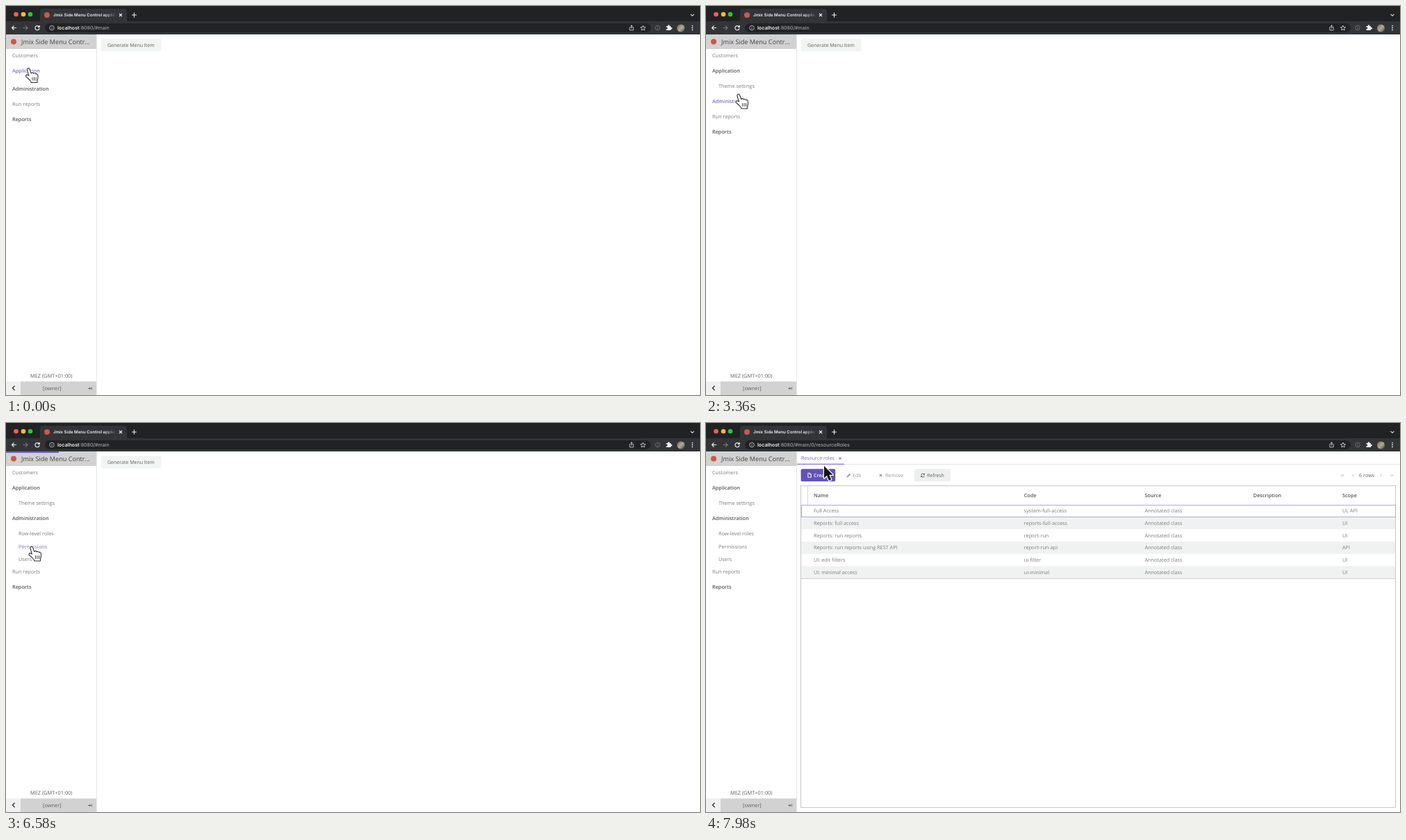
An HTML page with a canvas for the animation above (8 s loop, 999x561 px).

```html
<!DOCTYPE html>
<html lang="en">
<head>
<meta charset="utf-8">
<title>Side menu</title>
<style>
html, body { margin: 0; width: 100%; height: 100%; overflow: hidden; background: #fff; }
canvas { display: block; }
</style>
</head>
<body>
<canvas width="999" height="561"></canvas>
<script>
const LOOP = 8000, STEP = 70;
const APP = '"Open Sans", sans-serif', CHROME = 'Inter, sans-serif';
const PURPLE = '#6351b8', GREY = '#7c7c7c', DARK = '#585858';
const c = document.querySelector('canvas').getContext('2d');
c.textRendering = 'geometricPrecision';

// Pointer hot spot: time, x, y
const PATH = [
  [70, 32.5, 90.5], [840, 34, 91], [1680, 35, 90.5], [2730, 35, 90.5],
  [3360, 47, 128], [3500, 48, 129], [4060, 48, 129], [4550, 49, 131],
  [4900, 65, 165], [5460, 56, 175], [5810, 37, 179], [7210, 37, 179],
  [7910, 170, 62]
];
const ROLES = [
  ['Full Access', 'system-full-access', 'UI, API'],
  ['Reports: full access', 'reports-full-access', 'UI'],
  ['Reports: run reports', 'report-run', 'UI'],
  ['Reports: run reports using REST API', 'report-run-api', 'API'],
  ['UI: edit filters', 'ui-filter', 'UI'],
  ['UI: minimal access', 'ui-minimal', 'UI']
];
const HAND = new Path2D('M3 3.5C2.2 .5 5.6-.4 6.6 2.2L8.8 8C10 6.6 12 7 12.3 8.4C13.4 7.2 15.2 7.8 15.4 9.2C16.6 8.4 18.2 9 18.4 11C18.8 14 18.6 16 17.6 18.2L17.4 21.5H8.6L8.2 19.5C6 17 4.4 15.4 1.2 12.8C.2 11.4 1.8 9.6 3.6 10.4L5.4 11.6Z');
const FINGERS = new Path2D('M10.4 13.5l.2 5M13 13.5v5M15.6 13.5l-.1 5');
const ARROW = new Path2D('M0 0V17.5L4 13.8L7 21L10.2 19.6L7.2 12.7H12.6Z');

const ramp = (t, from, to) => Math.min(1, Math.max(0, (t - from) / (to - from)));
const smooth = k => k * k * (3 - 2 * k);

function pointerAt(t) {
  let i = 1;
  while (i < PATH.length - 1 && t > PATH[i][0]) i++;
  const [t0, x0, y0] = PATH[i - 1], [t1, x1, y1] = PATH[i];
  const k = smooth(ramp(t, t0, t1));
  return { x: x0 + (x1 - x0) * k, y: y0 + (y1 - y0) * k };
}

function rect(x, y, w, h, fill, radius = 0) {
  c.fillStyle = fill;
  c.beginPath();
  c.roundRect(x, y, w, h, radius);
  c.fill();
}

function frame(x, y, w, h, stroke) {
  c.strokeStyle = stroke;
  c.lineWidth = 1;
  c.strokeRect(x + .5, y + .5, w - 1, h - 1);
}

function dot(x, y, r, fill) {
  c.fillStyle = fill;
  c.beginPath();
  c.arc(x, y, r, 0, 7);
  c.fill();
}

// y is the middle of the lower-case letters
function text(s, x, y, fill = GREY, size = 7.3, weight = 400, font = APP) {
  c.font = `${weight} ${size}px ${font}`;
  c.fillStyle = fill;
  c.fillText(s, x, y + size * .36);
  return x + c.measureText(s).width;
}

function icon(d, x, y, color, width = 1, fill = false) {
  c.save();
  c.translate(x, y);
  c.strokeStyle = c.fillStyle = color;
  c.lineWidth = width;
  const p = new Path2D(d);
  fill ? c.fill(p) : c.stroke(p);
  c.restore();
}

const CROSS = 'M-2-2L2 2M2-2L-2 2', SMALL_CROSS = 'M-1.6-1.6L1.6 1.6M1.6-1.6L-1.6 1.6';
const RELOAD = 'M2.6-1.6A3.1 3.1 0 1 0 3.1 .6M3.2-3.4V-1.2H1';
const REFRESH = 'M-2.4-.4A2.4 2.4 0 0 1 2-1.4M2.4-2.6V-1H.8M2.4 .4A2.4 2.4 0 0 1-2 1.4M-2.4 2.6V1H-.8';
const RING = 'M3.3 0A3.3 3.3 0 1 1-3.3 0A3.3 3.3 0 1 1 3.3 0M0-.4V1.8M0-1.8V-1.1';

function browser(pageOpen) {
  rect(0, 0, 999, 23, '#202224');
  rect(0, 22, 999, 19, '#323437');
  rect(49, 4, 125, 20, '#323437', [4, 4, 0, 0]);
  rect(56, 25, 872, 13, '#202224', 6.5);
  dot(14.5, 12, 3.3, '#fc5b57');
  dot(25, 12, 3.3, '#f8bc30');
  dot(35, 12, 3.3, '#2ac53f');
  dot(59, 13, 4, '#c9594c');

  const fade = c.createLinearGradient(140, 0, 158, 0);
  fade.addColorStop(0, '#f1f1f1');
  fade.addColorStop(1, '#f1f1f122');
  c.save();
  c.beginPath();
  c.rect(60, 0, 98, 23);
  c.clip();
  text('Jmix Side Menu Control application', 68, 13, fade, 6.1, 600, CHROME);
  c.restore();

  icon(CROSS, 165, 13, '#eee', 1.1);
  icon('M-3.4 0H3.4M0-3.4V3.4', 184.5, 13, '#eee', 1.1);
  icon('M-2.5-1.2L0 1.2L2.5-1.2', 988, 13, '#ddd', 1.1);
  icon('M3.6 0H-3M0-3L-3 0L0 3', 11.5, 31.5, '#eee', 1.2);
  icon('M-3.6 0H3M0-3L3 0L0 3', 28, 31.5, '#777', 1.1);
  icon(RELOAD, 45, 31.5, '#eee', 1.2);
  icon(RING, 66, 31.5, '#ccc', .8);
  const end = text('localhost', 74, 31.5, '#f5f5f5', 7.15, 600, CHROME);
  text(':8080/#main' + (pageOpen ? '/0/resourceRoles' : ''), end, 31.5, '#b4b6b9', 7.15, 400, CHROME);

  icon('M-1.2-1H-2.6V3.4H2.6V-1H1.2M0 1V-3.6M-1.6-2.2L0-3.7L1.6-2.2', 900.5, 31.5, '#ccc', .9);
  icon('M0-3.6L1-1.2L3.6-1L1.6 .7L2.2 3.2L0 1.9L-2.2 3.2L-1.6 .7L-3.6-1L-1-1.2Z', 917, 31.7, '#ccc', .9);
  icon(RING, 938, 31.5, '#72757a', .9);
  icon('M-3.5-2H-1.2A1.3 1.3 0 1 1 1.2-2H3V.1A1.3 1.3 0 1 1 3 2.2V4H-3.5V1.9A1.2 1.2 0 1 0-3.5-.2Z', 954, 31, '#eee', 1, true);
  const tones = c.createLinearGradient(966, 26, 977, 37);
  tones.addColorStop(0, '#6d6a4c');
  tones.addColorStop(.55, '#b5a893');
  tones.addColorStop(1, '#4b4a3c');
  dot(971.5, 32, 5.5, tones);
  for (const y of [28.6, 31.5, 34.4]) dot(988, y, .9, '#eee');
}

function menuRows(a, b) {
  const first = 119.4 + 18.3 * a, run = first + 21.8 + 55 * b;
  const root = (label, y, bold) => ({ label, y, x: 9, bold, open: 1 });
  const child = (label, parent, dy, next, open) =>
    ({ label, y: parent + dy, x: 18, open, top: parent + 11, bottom: next - 9 });
  return [
    root('Customers', 71.5),
    root('Application', 93.5, true),
    child('Theme settings', 93.5, 22.2, first, a),
    root('Administration', first, true),
    child('Row-level roles', first, 21.8, run, b),
    child('Permissions', first, 40.2, run, b),
    child('Users', first, 58.8, run, b),
    root('Run reports', run),
    root('Reports', run + 21.8, true)
  ];
}

function sidebar(t, p) {
  rect(130, 41, 1, 520, '#e6e6e6');
  rect(0, 41, 130, 21, '#d2d2d2');
  dot(11, 51.5, 4, '#c9594c');
  text('Jmix Side Menu Contr…', 22, 51.7, '#444', 9.15);

  const rows = menuRows(ramp(t, 2030, 2170), ramp(t, 4060, 4240)).filter(r => r.open > 0);
  const gap = r => Math.abs(r.y - p.y);
  const hot = p.x < 130 && p.y > 62
    ? rows.filter(r => r.open > .5).reduce((m, r) => gap(r) < gap(m) ? r : m) : null;
  for (const r of rows) {
    c.save();
    if (r.top) {
      c.beginPath();
      c.rect(0, r.top, 130, r.bottom - r.top);
      c.clip();
    }
    text(r.label, r.x, r.y, r === hot ? '#7b6fca' : r.bold ? DARK : GREY, 7.3, r.bold ? 600 : 400);
    c.restore();
  }

  text('MEZ (GMT+01:00)', 35, 533, '#606060', 7.4);
  rect(0, 541.5, 21, 20, '#f0f0f0');
  rect(21, 541.5, 109, 20, '#d2d2d2');
  icon('M1.6-3.2L-1.6 0L1.6 3.2', 11, 551, '#333', 1.3);
  text('[owner]', 53, 551, '#606060', 7.4);
  icon('M-2.8-.6H-.6V-2L1.6 0L-.6 2V.6H-2.8ZM2-2H2.8V2H2Z', 121, 551.5, '#666', 1, true);
}

function home() {
  rect(136.8, 47.3, 86.8, 18, '#f2f3f3', 2);
  text('Generate Menu Item', 146, 56.5, '#606060', 7.03);
}

function rolesPage() {
  text('Resource roles', 137, 50.5, '#7568c4', 7);
  icon(SMALL_CROSS, 193, 51, PURPLE, .9);
  rect(131, 59, 868, 1, '#e6e6e6');
  rect(131, 58.8, 68, 1.2, '#8477c6');

  rect(136.6, 66.2, 49.6, 18, PURPLE, 2);
  icon('M-2.2-3H.6L2.3-1.3V3H-2.2ZM.4-3V-1H2.3', 149, 75.3, '#fff', .9);
  text('Create', 155, 75.3, '#fff', 7, 600);
  icon('M-3 3L-2.4 1L1.4-2.8L2.8-1.4L-1 2.4Z', 205.5, 75.5, '#999', 1, true);
  text('Edit', 211, 75.3, '#999', 7);
  icon(SMALL_CROSS, 251.5, 75.5, '#999', 1.4);
  text('Remove', 258, 75.3, '#999', 7);
  rect(299.8, 66.2, 52.4, 18, '#eeefef', 2);
  icon(REFRESH, 312, 75.5, '#555', .9);
  text('Refresh', 318, 75.3, '#606060', 7);

  const chevron = 'M.8-1.6L-.8 0L.8 1.6', back = 'M-.8-1.6L.8 0L-.8 1.6';
  for (const x of [915, 917.5, 931.5]) icon(chevron, x, 75.5, '#aaa', .8);
  for (const x of [971.5, 986, 988.5]) icon(back, x, 75.5, '#aaa', .8);
  text('6 rows', 940, 75.3, '#606060');

  const cols = [155, 457.7, 631.5, 787.8, 916];
  ['Name', 'Code', 'Source', 'Description', 'Scope'].forEach((s, i) => text(s, cols[i], 104.3, DARK, 7.3, 600));
  rect(146, 91, 1, 27, '#d8d8d8');
  ROLES.forEach(([name, code, scope], i) => {
    const y = 126.8 + 17.68 * i;
    if (i % 2) rect(137, y - 8.8, 856, 17.68, '#f0f2f2');
    text(name, cols[0], y);
    text(code, cols[1], y);
    text('Annotated class', cols[2], y);
    text(scope, cols[4], y);
  });
  rect(137, 224, 856, 1, '#cfcfcf');
  frame(136, 90, 857, 465, '#c6c6c6');
  frame(137, 118, 856, 18, '#b0adca');
}

function pointer(p) {
  const hand = p.x < 130 && p.y > 62;
  c.save();
  c.lineJoin = 'round';
  c.translate(p.x - (hand ? 5 : 0), p.y - (hand ? 1.5 : 0));
  if (hand) {
    c.strokeStyle = '#fff';
    c.lineWidth = 3;
    c.stroke(HAND);
    c.fillStyle = '#fff';
    c.fill(HAND);
    c.strokeStyle = '#333';
    c.lineWidth = 1.1;
    c.stroke(HAND);
    c.lineWidth = .9;
    c.stroke(FINGERS);
  } else {
    c.strokeStyle = '#fff';
    c.lineWidth = 2.4;
    c.stroke(ARROW);
    c.fillStyle = '#111';
    c.fill(ARROW);
  }
  c.restore();
}

function draw(now) {
  const t = Math.floor(now % LOOP / STEP) * STEP;
  const p = pointerAt(t), pageOpen = t >= 6930;
  rect(0, 0, 999, 561, '#fff');
  browser(pageOpen);
  sidebar(t, p);
  pageOpen ? rolesPage() : home();

  // Loading bar: slow start, then a jump to full width
  if (t >= 6510 && t < 7350) {
    const w = t < 6580 ? 38 : t < 6930 ? 76 + (t - 6580) * .9 : 999;
    rect(0, 41.2, w, 1.8, PURPLE);
  }
  c.globalAlpha = Math.min(ramp(t, 6930, 7140), 1 - ramp(t, 7280, 7490));
  rect(0, 551, 332.5, 10, '#484a4d', [0, 2, 0, 0]);
  text('Warten auf localhost…', 3, 556.7, '#d5d6d8', 6, 400, CHROME);
  c.globalAlpha = 1;
  pointer(p);
}

const start = performance.now();
function tick() {
  draw(performance.now() - start);
  requestAnimationFrame(tick);
}
tick();
</script>
</body>
</html>
```
